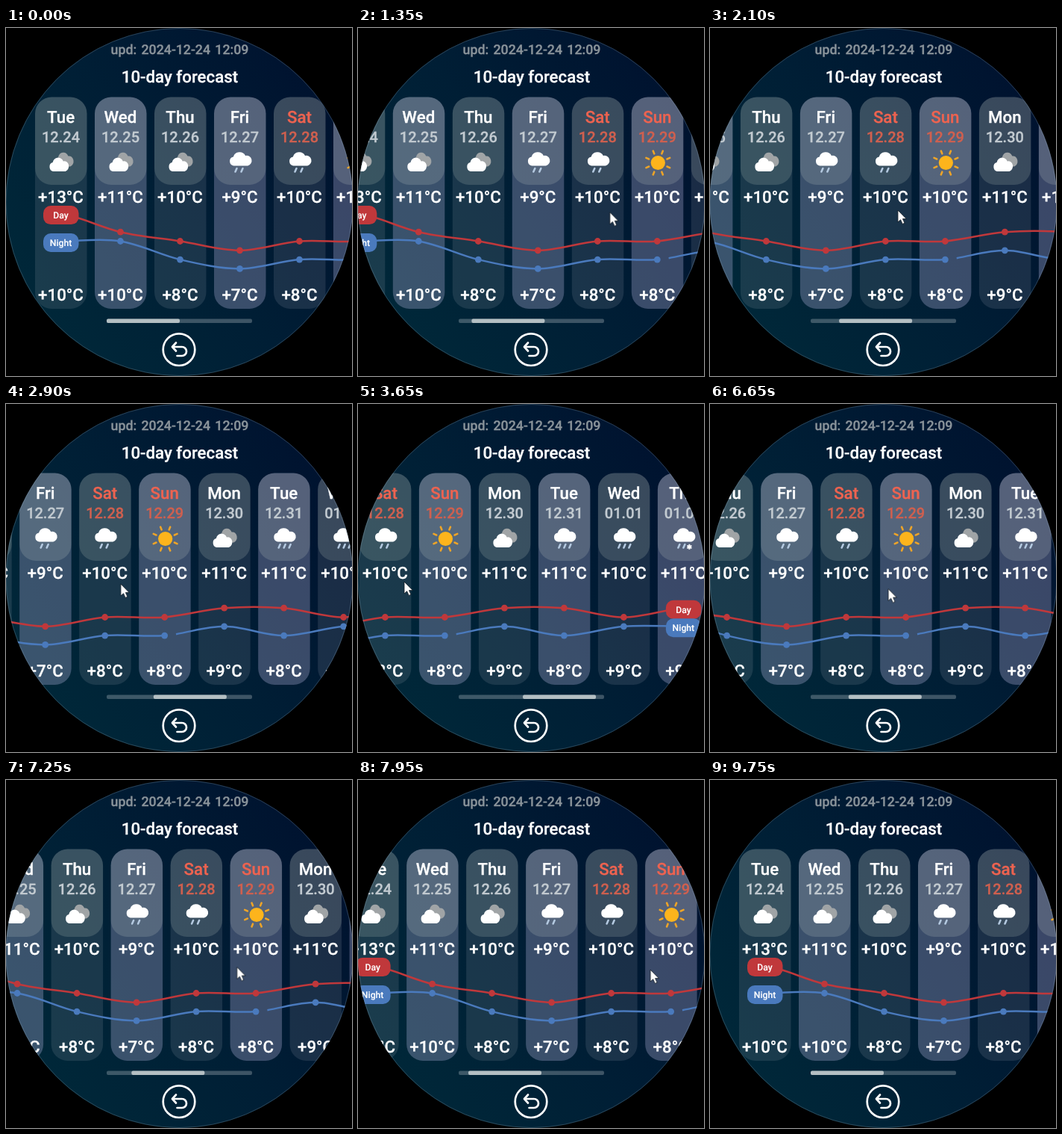
An HTML page for the animation above (9800 ms loop, 464 by 466 pixels).

```html
<!DOCTYPE html>
<html lang="en">
<head>
<meta charset="utf-8">
<title>10-day forecast</title>
<style>
@property --scroll { syntax: "<number>"; inherits: true; initial-value: 0; }
html, body { margin: 0; width: 100%; height: 100%; overflow: hidden; background: #000; }
svg { display: block; width: 464px; height: 466px; animation: scroll 9.8s linear infinite; }
text { font-family: Roboto, sans-serif; font-weight: 500; text-anchor: middle; fill: #fff; stroke: #fff; stroke-width: .3; white-space: pre; text-rendering: geometricPrecision; }
.big { font-size: 22.3px; }
.date { font-size: 20px; fill: #c3cbd1; stroke: #c3cbd1; }
.updated { font-size: 17.8px; word-spacing: -1.3px; fill: #8b949b; stroke: #8b949b; }
.weekend .day { fill: #ee6350; stroke: #ee6350; }
.weekend .date { fill: #d0604f; stroke: #d0604f; }
.tag { font-size: 12.2px; stroke-width: .15; }
.line { fill: none; stroke-width: 2.5; }
#strip { transform: translateX(calc(var(--scroll) * -1px)); }
#thumb { transform: translateX(calc(var(--scroll) * .241px)); }
#cursor { animation: point 9.8s linear infinite; }

@keyframes scroll {
  0% { --scroll: 0; }
  6.122% { --scroll: 0; animation-timing-function: cubic-bezier(.4, 0, .75, .65); }
  10.204% { --scroll: 32; }
  21.429% { --scroll: 158; }
  37.245% { --scroll: 357; animation-timing-function: cubic-bezier(.2, .58, .5, 1); }
  47.959% { --scroll: 403; }
  50.51% { --scroll: 403; animation-timing-function: cubic-bezier(.5, 0, .8, .3); }
  56.633% { --scroll: 378; }
  67.857% { --scroll: 211; }
  81.122% { --scroll: 54; animation-timing-function: cubic-bezier(.3, .5, .6, 1); }
  88.776%, 100% { --scroll: 0; }
}
@keyframes point {
  0% { transform: translate(470px, 258px); }
  6.122% { transform: translate(410px, 250px); animation-timing-function: cubic-bezier(.4, 0, .75, .65); }
  10.204% { transform: translate(378px, 248px); }
  21.429% { transform: translate(252px, 244px); }
  37.245% { transform: translate(62px, 238px); animation-timing-function: cubic-bezier(.2, .58, .5, 1); }
  47.959%, 50.51% { transform: translate(43px, 238px); animation-timing-function: cubic-bezier(.5, 0, .8, .3); }
  56.633% { transform: translate(65px, 238px); }
  67.857% { transform: translate(239px, 247.5px); }
  81.122% { transform: translate(392px, 254px); }
  88.776% { transform: translate(446px, 258px); }
  91.837%, 100% { transform: translate(470px, 258px); }
}
</style>
</head>
<body>
<svg viewBox="0 0 464 466">
  <defs>
    <linearGradient id="sky" x1=".05" y1=".8" x2=".95" y2=".2">
      <stop offset="0" stop-color="#002839"/>
      <stop offset=".5" stop-color="#001e35"/>
      <stop offset="1" stop-color="#00122f"/>
    </linearGradient>
    <clipPath id="dial"><circle cx="232.500" cy="233" r="233"/></clipPath>
    <path id="cloud" d="M6 18A5.8 5.8 0 0 1 5.6 6.6A8.4 8.4 0 0 1 21 5.2A6.5 6.5 0 0 1 24 18Z"/>
    <path id="drop" d="M2 0L0 4.5" stroke="#b4c9e0" stroke-width="2.6" stroke-linecap="round"/>
    <g id="overcast">
      <use href="#cloud" transform="translate(-8.500 166) scale(.88 1.080)" fill="#a0a4a6"/>
      <use href="#cloud" transform="translate(-16 173) scale(.92 1.050)" fill="#fff"/>
    </g>
    <g id="shower">
      <use href="#cloud" transform="translate(-14.500 165.500) scale(1.050)" fill="#fff"/>
    </g>
    <g id="rain2">
      <use href="#shower"/><use href="#drop" x="-6" y="188"/><use href="#drop" x="2" y="188"/>
    </g>
    <g id="rain3">
      <use href="#shower"/><use href="#drop" x="-7" y="188"/><use href="#drop" x="0" y="188"/><use href="#drop" x="7" y="188"/>
    </g>
    <g id="sleet">
      <use href="#shower"/><use href="#drop" x="-7" y="188"/><use href="#drop" x="0" y="188"/>
      <path d="M8 187.800v7M5 189.600l6 3.500M11 189.600l-6 3.500" stroke="#fff" stroke-width="1.900"/>
    </g>
    <g id="sun">
      <circle cx="1" cy="180.500" r="9.600" fill="#fdb41c"/>
      <g id="rays" stroke="#eda428" stroke-width="2.600" stroke-linecap="round"></g>
    </g>
  </defs>
  <g clip-path="url(#dial)">
    <rect width="464" height="466" fill="url(#sky)"/>
    <text x="233" y="35" class="updated">upd:  2024-12-24  12:09</text>
    <text x="233" y="73" class="big">10-day forecast</text>
    <g id="strip"></g>
    <rect x="135" y="389.500" width="195" height="5.500" rx="2" fill="#fff" opacity=".24"/>
    <rect id="thumb" x="135" y="389.500" width="98" height="5.500" rx="2" fill="#b4bfc3"/>
    <g fill="none" stroke="#fff" stroke-width="2.700">
      <circle cx="232" cy="430.700" r="21.300"/>
      <path d="M228 421.500l-5 5.500l5 5.500M224 427h12a6 6 0 0 1 0 12h-6.500" stroke-linecap="round" stroke-linejoin="round"/>
    </g>
  </g>
  <circle cx="232.500" cy="233" r="232.500" fill="none" stroke="#8aa0ac" stroke-opacity=".3"/>
  <path id="cursor" d="M0 0V16L3.600 12.700L6.200 18.400L9 17.200L6.500 11.600H11.300Z" fill="#fff" stroke="#101820" stroke-width=".8"/>
</svg>
<script>
const GAP = 80, LEFT = 73.5;
const names = "Tue Wed Thu Fri Sat Sun Mon".split(" ");
const icons = "overcast overcast overcast rain2 rain2 sun overcast rain3 rain3 sleet".split(" ");
const highs = [13, 11, 10, 9, 10, 10, 11, 11, 10, 11];
const lows = [10, 10, 8, 7, 8, 8, 9, 8, 9, 9];

const colX = i => LEFT + i * GAP;
const tempY = t => 273.2 + (11 - t) * 12.3;
const label = (x, y, cls, s) => `<text x="${x}" y="${y}" class="${cls}">${s}</text>`;

function column(i) {
  const date = new Date(Date.UTC(2024, 11, 24 + i)).toISOString().slice(5, 10).replace("-", ".");
  const weekend = i === 4 || i === 5;
  const body = i % 2 ? "rgba(215,205,250,.27)" : "rgba(255,245,255,.1)";
  return `<g transform="translate(${colX(i)})" class="${weekend ? "weekend" : ""}">
    <rect x="-34.5" y="92.5" width="69.5" height="283.5" rx="22" fill="${body}"/>
    <rect x="-34.5" y="92.5" width="69.5" height="117.5" rx="22" fill="rgba(245,250,235,.14)"/>
    ${label(0, 126.8, "big day", names[i % 7])}
    ${label(0, 153, "date", date)}
    <use href="#${icons[i]}"/>
    ${label(0, 233.5, "big", `+${highs[i]}°C`)}
    ${label(0, 365.3, "big", `+${lows[i]}°C`)}
  </g>`;
}

// Catmull-Rom curve through the temperatures; a segment may have its start hidden
function chart(temps, color, name, gapAt) {
  const y = temps.map(tempY), last = y.length - 1;
  const at = i => y[Math.max(0, Math.min(last, i))];
  let out = "";
  for (let i = 0; i < last; i++) {
    const x = colX(i);
    const d = `M${x} ${y[i]}C${x + GAP / 3} ${y[i] + (at(i + 1) - at(i - 1)) / 6} `
      + `${x + GAP * 2 / 3} ${y[i + 1] - (at(i + 2) - y[i]) / 6} ${x + GAP} ${y[i + 1]}`;
    const dash = i === gapAt ? ' stroke-dasharray="0 15.5 100"' : "";
    out += `<path class="line" d="${d}" stroke="${color}"${dash}/>`;
    if (i) out += `<circle cx="${x}" cy="${y[i]}" r="4.4" fill="${color}"/>`;
  }
  for (const i of [0, last]) {
    const x = colX(i), cy = y[i] + 2;
    out += `<rect x="${x - 23.5}" y="${cy - 12.5}" width="47.5" height="25" rx="10" fill="${color}"/>`
      + label(x, cy + 4.5, "tag", name);
  }
  return out;
}

document.getElementById("strip").innerHTML = highs.map((_, i) => column(i)).join("")
  + chart(highs, "#c0383b", "Day") + chart(lows, "#4a7abd", "Night", 5);
document.getElementById("rays").innerHTML = Array.from({ length: 8 }, (_, i) =>
  `<path d="M1 167.300v-4" transform="rotate(${i * 45 + 22.5} 1 180.500)"/>`).join("");
</script>
</body>
</html>
```
